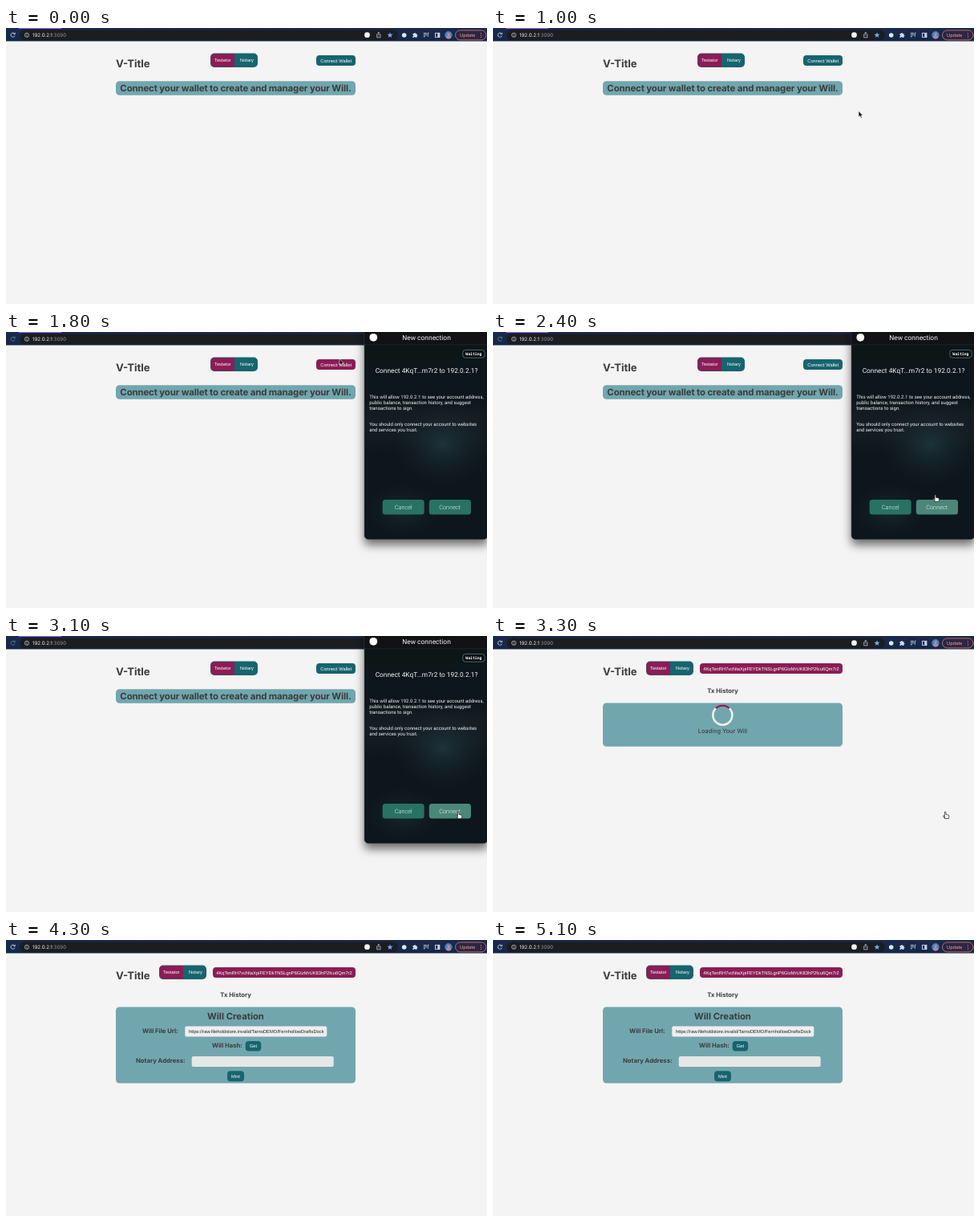
An HTML page that plays this animation: 600 by 344 pixels, repeating every 5200 ms.

```html
<!DOCTYPE html>
<html lang="en">
<head>
<meta charset="utf-8">
<title>Wallet connection</title>
<style>
  html, body { margin: 0; width: 100%; height: 100%; overflow: hidden; background: #f4f4f4; }
  svg { display: block; width: 600px; height: 344px; }
  text { font-family: Inter, sans-serif; text-rendering: geometricPrecision; white-space: pre; }
  .b { font-weight: 700; fill: #3a3b3d; }
  .btn { font: 5.77px "Liberation Sans", Arial, sans-serif; fill: #fff; text-anchor: middle; }
  .field { font: 5.77px "Liberation Sans", Arial, sans-serif; fill: #222; }
  .pop { font-family: Roboto, sans-serif; fill: #f2f4f4; }
  .thin { font-weight: 300; text-anchor: middle; }
  .mono { font: 700 4.8px "DejaVu Sans Mono", monospace; fill: #fff; text-anchor: middle; }
  .line { fill: none; stroke: #d5dbe8; stroke-width: .9; }
</style>
</head>
<body>
<svg viewBox="0 0 600 344" xmlns="http://www.w3.org/2000/svg">
  <defs>
    <linearGradient id="bar" x2="0" y2="1">
      <stop offset="0" stop-color="#1b2a4c"/><stop offset="1" stop-color="#14284a"/>
    </linearGradient>
    <linearGradient id="blank" x2=".3" y2="1">
      <stop offset="0" stop-color="#e9eceb"/><stop offset=".5" stop-color="#f1f3f2"/><stop offset="1" stop-color="#e6ebe9"/>
    </linearGradient>
    <radialGradient id="smudge">
      <stop offset="0" stop-color="#b9c4c0" stop-opacity=".8"/><stop offset="1" stop-color="#d5dcd9" stop-opacity="0"/>
    </radialGradient>
    <linearGradient id="night" x2="0" y2="1">
      <stop offset="0" stop-color="#0e1215"/><stop offset=".45" stop-color="#121b21"/>
      <stop offset=".75" stop-color="#10171c"/><stop offset="1" stop-color="#10191f"/>
    </linearGradient>
    <radialGradient id="globe">
      <stop offset="0" stop-color="#24404a" stop-opacity=".65"/><stop offset="1" stop-color="#18262d" stop-opacity="0"/>
    </radialGradient>
    <filter id="shade" x="-30%" y="-20%" width="160%" height="150%">
      <feDropShadow dx="0" dy="7" stdDeviation="6" flood-color="#000" flood-opacity=".55"/>
    </filter>
    <clipPath id="urlBox"><rect x="228" y="107" width="168.5" height="14"/></clipPath>
  </defs>

  <rect width="600" height="344" fill="#f4f4f4"/>

  <g id="toolbar">
    <rect width="600" height="16.5" fill="url(#bar)"/>
    <rect id="tab" x="16" width="53" height="1" fill="#9a63e8"/>
    <g id="reload"><path class="line" d="M10.9 7.4A2.6 2.6 0 1 0 11.1 9.6M11.2 5.8V7.7H9.3"/></g>
    <rect x="17" y="2.3" width="472" height="13" rx="6.5" fill="#1b1d21"/>
    <circle class="line" cx="26" cy="8.8" r="2.6" style="stroke-width:.7"/>
    <path class="line" d="M26 8.4V10.4M26 7V7.6" style="stroke-width:.7"/>
    <text x="33" y="11" font-size="6.2" fill="#eceef1">192.0.2.1<tspan fill="#8f949b">:3090</tspan></text>
    <circle cx="450.5" cy="8.7" r="3.4" fill="#f1f1f1"/>
    <path class="line" d="M463.6 7.8H462.7V11.8H467V7.8H466.1M464.85 9.6V5.2M463.5 6.5L464.85 5.2L466.2 6.5" style="stroke-width:.7"/>
    <path id="star" fill="#74a9f7"/>
    <g id="icons">
      <circle cx="496.7" cy="9" r="2.8" fill="#e3e7ee"/>
      <path fill="#d5dbe8" d="M507.4 7H509a1 1 0 1 1 2 0H512.4V8.5a1 1 0 1 1 0 2V12H510.8a.9 .9 0 1 0-1.8 0H507.4V10.2a.9 .9 0 1 0 0-1.8Z"/>
      <path class="line" d="M520.8 6.5H525M520.8 8.6H525M520.8 10.7H523M526.2 10.8V6.3H527.6"/>
      <rect class="line" x="535.5" y="6.3" width="5.4" height="5.2"/>
      <rect x="538.4" y="6.3" width="2.5" height="5.2" fill="#d5dbe8"/>
      <circle cx="552" cy="8.8" r="4.7" fill="#4b7fc0"/>
      <path d="M549 12.3C549 9.6 550.4 9.8 551 9.2A1.8 1.8 0 1 1 553.3 9.2C554 9.9 555.2 9.8 555.2 12.2A4.7 4.7 0 0 1 549 12.3Z" fill="#b58a94"/>
      <rect x="560.5" y="2.9" width="38.5" height="12" rx="6" fill="#2a2740" stroke="#e0797a" stroke-width=".8"/>
      <text x="566" y="11" font-size="5.6" font-weight="500" fill="#f08f8a">Update</text>
      <g fill="#f08f8a"><circle cx="592.5" cy="6.5" r=".6"/><circle cx="592.5" cy="8.9" r=".6"/><circle cx="592.5" cy="11.3" r=".6"/></g>
    </g>
  </g>

  <text class="b" x="137" y="48.6" font-size="13.1">V-Title</text>
  <g id="nav">
    <rect x="255" y="31.5" width="59" height="17.5" rx="5" fill="#17646f"/>
    <path d="M285 32H260a4.5 4.5 0 0 0-4.5 4.5V44a4.5 4.5 0 0 0 4.5 4.5H285Z" fill="#8a1d55"/>
    <text class="btn" x="270.3" y="42.3">Testator</text>
    <text class="btn" x="300.5" y="42.3">Notary</text>
  </g>

  <g id="start">
    <rect id="wallet" x="387" y="34" width="49" height="13" rx="4"/>
    <text class="btn" x="411.7" y="42.5">Connect Wallet</text>
    <rect x="137" y="66.3" width="299" height="17.5" rx="4.5" fill="#72a6ae"/>
    <text class="b" x="286.5" y="79.4" font-size="11.4" letter-spacing="-.12" text-anchor="middle">Connect your wallet to create and manager your Will.</text>
  </g>

  <g id="account">
    <rect x="258" y="34" width="178" height="13" rx="4" fill="#8a1d55"/>
    <text class="btn" x="347" y="42.5">4KqTenRH7vcNtaXpiFEYDkTNSLgnP6GtzMrUK83hP2fcu6Qm7r2</text>
    <text class="b" x="286.5" y="71.3" font-size="7.7" text-anchor="middle">Tx History</text>
    <rect id="panel" x="137" y="83.5" width="299" rx="4.5" fill="#72a6ae"/>
  </g>

  <g id="loading">
    <circle cx="286.4" cy="98.7" r="12" fill="none" stroke="#f3f3f3" stroke-width="2.5"/>
    <path id="arc" d="M277.9 90.2A12 12 0 0 1 294.9 90.2" fill="none" stroke="#8a1d55" stroke-width="2.5"/>
    <text x="286.5" y="121.2" font-size="7.45" fill="#333" text-anchor="middle">Loading Your Will</text>
  </g>

  <g id="form">
    <text class="b" x="286.5" y="99" font-size="11.3" text-anchor="middle">Will Creation</text>
    <g font-size="7.7">
      <text class="b" x="170" y="115.8">Will File Url:</text>
      <text class="b" x="257" y="134">Will Hash:</text>
      <text class="b" x="162" y="153">Notary Address:</text>
    </g>
    <rect x="223.3" y="107.5" width="177" height="13" rx="2" fill="#eeeeee"/>
    <text class="field" x="228" y="116" clip-path="url(#urlBox)">https://raw.fileholdstore.invalid/TarnoDEMO/FernhollowDraftsDocket</text>
    <rect x="231.7" y="145" width="177" height="13" rx="2" fill="#e6e7e7"/>
    <rect x="298.7" y="126" width="19.5" height="12.5" rx="4" fill="#17646f"/>
    <text class="btn" x="308.4" y="134.3">Get</text>
    <rect x="276" y="163.2" width="21" height="13" rx="4" fill="#17646f"/>
    <text class="btn" x="286.5" y="171.7">Mint</text>
  </g>

  <g id="opening">
    <rect x="507.7" y="14.5" width="75.5" height="128.5" rx="3" fill="url(#blank)" stroke="#8d8d8d" stroke-width=".4" filter="url(#shade)"/>
    <ellipse cx="533" cy="129" rx="17" ry="12" fill="url(#smudge)"/>
    <path d="M507.7 22.8V14.5H583.2V22.8Z" fill="#6f5f62"/>
    <circle cx="511.5" cy="18.4" r="1.6" fill="#e46a62"/>
    <circle cx="517.2" cy="18.4" r="1.6" fill="#d8d0d0"/>
    <circle cx="522.8" cy="18.4" r="1.5" fill="#8d8083"/>
  </g>

  <g id="popup">
    <rect x="447" y="-10" width="154" height="268.5" rx="5" fill="url(#night)" stroke="#3e474b" stroke-width=".5" filter="url(#shade)"/>
    <ellipse cx="545" cy="140" rx="62" ry="52" fill="url(#globe)"/>
    <ellipse cx="495" cy="222" rx="48" ry="34" fill="url(#globe)" opacity=".7"/>
    <rect x="447.3" width="153" height="15.5" fill="#101214"/>
    <path d="M447.3 15.7H600" stroke="#272d31" stroke-width=".6"/>
    <circle cx="458.3" cy="6.8" r="4.9" fill="#fff"/>
    <text class="pop" x="524.5" y="9.5" font-size="8.45" text-anchor="middle">New connection</text>
    <rect x="569.8" y="22.4" width="27.4" height="9.8" rx="3.5" fill="#0c1013" stroke="#5d8ca5" stroke-width=".7"/>
    <text class="mono" x="583.4" y="29">Waiting</text>
    <text class="pop" x="524.6" y="51.2" font-size="8.34" text-anchor="middle">Connect 4KqT...m7r2 to 192.0.2.1?</text>
    <g font-size="6.04">
      <text class="pop" x="453.2" y="83">This will allow 192.0.2.1 to see your account address,</text>
      <text class="pop" x="453.2" y="90.2">public balance, transaction history, and suggest</text>
      <text class="pop" x="453.2" y="97.4">transactions to sign.</text>
      <text class="pop" x="453.2" y="117">You should only connect your account to websites</text>
      <text class="pop" x="453.2" y="124.2">and services you trust.</text>
    </g>
    <g font-size="7.35">
      <rect x="469.7" y="209" width="52" height="18.5" rx="3.5" fill="#287263"/>
      <text class="pop thin" x="495.7" y="221">Cancel</text>
      <rect id="accept" x="527.8" y="209" width="52.2" height="18.5" rx="3.5"/>
      <text class="pop thin" x="553.7" y="221">Connect</text>
    </g>
  </g>

  <path id="arrow" d="M0 0V7.6L1.8 6L3 8.8L4.3 8.2L3.1 5.5H5.5Z" fill="#111" stroke="#fff" stroke-width=".6"/>
  <path id="hand" d="M-1.6 4.2V-3.2a.8 .8 0 0 1 1.6 0V-.6l3 .8q1 .3 .9 1.4L3.4 4.6H-1.4L-3.6 1.2q.3-1 2 .4" fill="#fff" stroke="#222" stroke-width=".75" stroke-linejoin="round"/>
</svg>
<script>
const LOOP = 5200, STEP = 100;
const $ = id => document.getElementById(id);
const show = (id, on) => $(id).style.display = on ? '' : 'none';
const set = (id, name, value) => $(id).setAttribute(name, value);
const within = (t, a, b) => t >= a && t < b;

// pointer stops: time, x, y
const stops = [
  [500, 556, 323], [600, 470, 128], [900, 470, 128], [1200, 416, 33.5],
  [1800, 416, 33.5], [2000, 446, 68], [2500, 565, 223],
  [3900, 565, 223], [4200, 607, 172]
];

function pointer(t) {
  const i = stops.findIndex(s => s[0] > t);
  if (i < 1) return null;
  const [t0, x0, y0] = stops[i - 1], [t1, x1, y1] = stops[i];
  const k = (t - t0) / (t1 - t0), e = k * k * (3 - 2 * k);
  return [x0 + (x1 - x0) * e, y0 + (y1 - y0) * e];
}

const starPoint = (_, i) => {
  const r = i % 2 ? 1.6 : 3.8, a = (i / 5 - .5) * Math.PI;
  return `${479 + r * Math.cos(a)} ${9 + r * Math.sin(a)}`;
};
set('star', 'd', 'M' + Array.from({ length: 10 }, starPoint).join('L') + 'Z');

function draw(now) {
  const t = Math.floor(now % LOOP / STEP) * STEP;
  const linked = t >= 3300, ready = t >= 3700;
  const blurred = within(t, 1600, 3300);

  show('tab', !linked);
  set('reload', 'opacity', blurred ? .4 : 1);
  set('icons', 'opacity', blurred ? .5 : 1);

  set('nav', 'transform', `translate(${linked ? -64 : 0})`);
  show('start', !linked);
  show('account', linked);
  show('loading', linked && !ready);
  show('form', ready);
  set('panel', 'height', ready ? 95 : 54.3);
  set('wallet', 'fill', within(t, 1200, 1900) ? '#8a1d55' : '#17646f');
  set('arc', 'transform', `rotate(${(t - 3300) * .18} 286.4 98.7)`);

  show('opening', within(t, 1600, 1700));
  show('popup', within(t, 1700, 3200));
  set('accept', 'fill', within(t, 2400, 3200) ? '#4a8779' : '#287263');

  const p = pointer(t), onHand = within(t, 2400, 4000);
  show('arrow', p && !onHand);
  show('hand', p && onHand);
  if (p) set(onHand ? 'hand' : 'arrow', 'transform', `translate(${p})`);
}

function tick() {
  draw(performance.now());
  requestAnimationFrame(tick);
}
tick();
</script>
</body>
</html>
```
